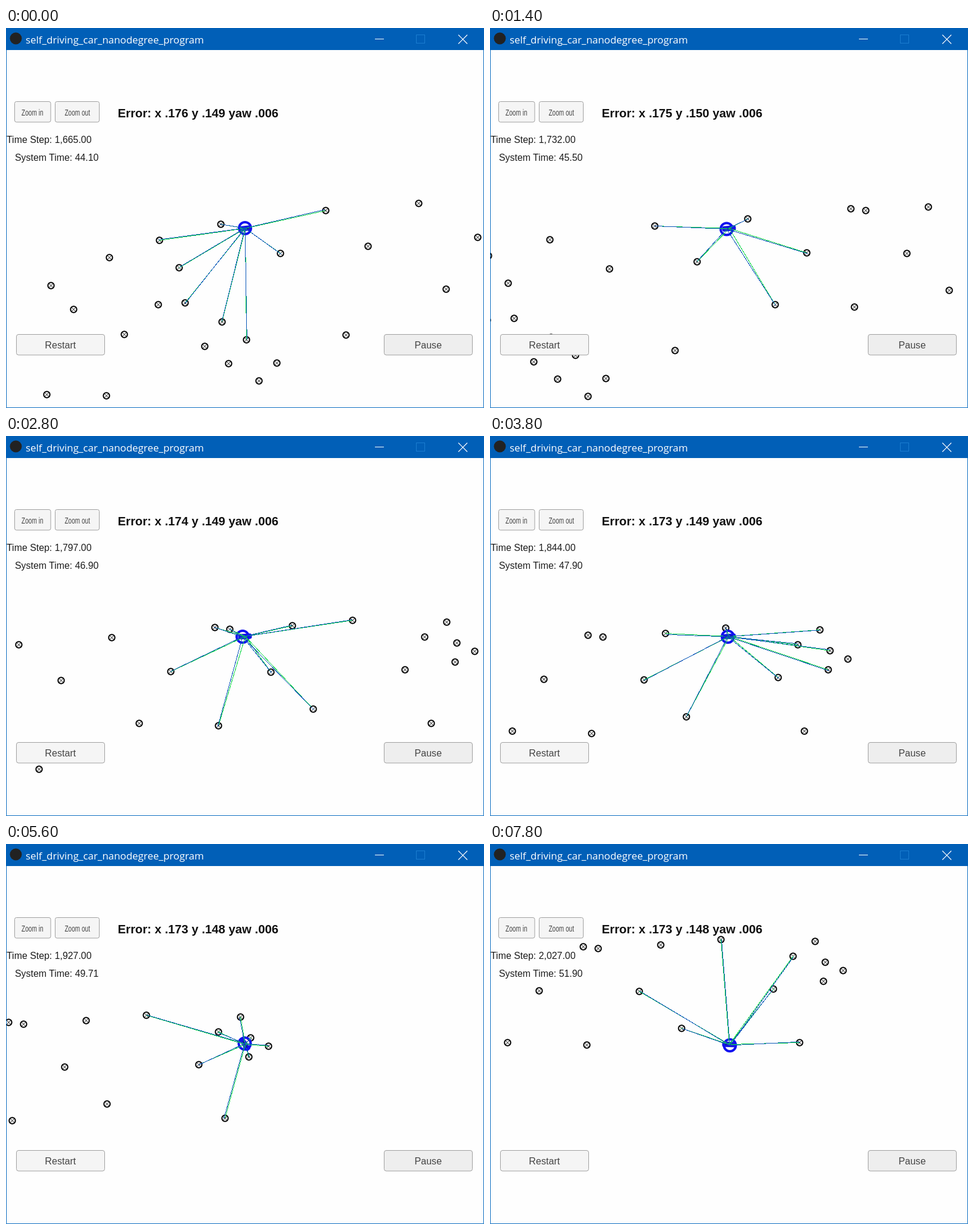
An HTML page that plays this animation: 802x638 px, repeating every 8 s.

```html
<!DOCTYPE html>
<html lang="en">
<head>
<meta charset="utf-8">
<title>Localization simulator</title>
<style>
html, body { margin: 0; width: 100%; height: 100%; overflow: hidden; background: #fefefe; }
svg { display: block; width: 802px; height: 638px; }
text { font-family: "Liberation Sans", Arial, sans-serif; font-size: 15.9px; fill: #1c1c1c; }
.title { font-family: "Open Sans", "Noto Sans", sans-serif; font-size: 16.9px; fill: #fff; }
.error { font-size: 20.3px; font-weight: bold; fill: #111; }
.label { font-size: 16.1px; fill: #444; text-anchor: middle; }
.small { font-size: 14px; }
.button rect { fill: #f5f5f5; stroke: #a0a0a0; }
.line { fill: none; stroke-width: 1; shape-rendering: crispEdges; }
</style>
</head>
<body>
<svg viewBox="0 0 802 638">
  <rect width="802" height="638" fill="#fefefe"/>
  <path id="rings" fill="none" stroke="#000" stroke-width="2"/>
  <path id="crosses" fill="none" stroke="#000" stroke-width="1"/>
  <g id="car">
    <rect x="-11.5" y="-4.5" width="23" height="9" rx="3.5" fill="#1616e4"/>
    <path d="M-6 0H7" stroke="#101070" stroke-width="2"/>
  </g>
  <circle id="guess" r="10" fill="none" stroke="#1010f0" stroke-width="4"/>
  <path id="sensed" class="line" stroke="#12d84a"/>
  <path id="believed" class="line" stroke="#0a58b8"/>

  <g class="button">
    <rect x="14.5" y="123.5" width="60.5" height="34.5" rx="3"/>
    <rect x="82.5" y="123.5" width="74" height="34.5" rx="3"/>
    <rect x="17.5" y="514.5" width="148" height="34.5" rx="3.5"/>
    <rect x="634.5" y="514.5" width="148" height="34.5" rx="3.5" style="fill:#eee"/>
  </g>
  <text class="label small" transform="translate(44.3 147) scale(.72 1)">Zoom in</text>
  <text class="label small" transform="translate(119.7 147) scale(.72 1)">Zoom out</text>
  <text class="label" x="91.3" y="538">Restart</text>
  <text class="label" x="708.3" y="538">Pause</text>
  <text id="error" class="error" x="187.5" y="150"></text>
  <text id="step" x="1" y="192.5"></text>
  <text id="clock" x="15" y="222.5"></text>

  <rect width="802" height="37" fill="#015fb7"/>
  <path d="M.5 37V637.5H801.5V37" fill="none" stroke="#0a6cc0"/>
  <circle cx="16.5" cy="17.5" r="10" fill="#222"/>
  <text class="title" x="33" y="26">self_driving_car_nanodegree_program</text>
  <g fill="none" stroke="#fff">
    <path d="M619 18.5H634"/>
    <rect x="688.5" y="11.5" width="14" height="14" stroke="#1b7cd0"/>
    <path d="M759 11.5L774 26.5M774 11.5L759 26.5" stroke-width="1.2"/>
  </g>
</svg>
<script>
const LOOP = 8000, TICK = 200, RANGE = 188.5;
const CAR = { x: 401, y: 336.5 };

// Landmarks in map pixels
const marks = [
  [536, 306], [692, 294], [607, 366], [791, 351], [738, 438], [360, 329], [257, 356], [173, 385],
  [290, 402], [300, 461], [255, 464], [75, 432], [113, 472], [198, 514], [362, 493], [403, 523],
  [333, 534], [373, 563], [454, 562], [424, 592], [570, 515], [460, 378], [68, 615], [168, 617],
  [865, 277], [890, 280], [995, 274], [959, 352], [871, 442], [1030, 414], [1096, 265], [1184, 348],
  [1217, 293], [1254, 268], [1271, 303], [1268, 335], [1301, 317], [1228, 438]
];

// Drive waypoints: time, position, velocity, errors (1/1000), step, clock, estimate offset
const route = [
  { t: 0,   x: 0,     y: 0,     vx: 187,  vy: -21, ex: 176, ey: 149, step: 1665, clock: 44.1,  dx: 0,   dy: -.5 },
  { t: 1.4, x: 259.7, y: -26.2, vx: 184,  vy: -15, ex: 175, ey: 150, step: 1732, clock: 45.5,  dx: -4,  dy: 1 },
  { t: 2.8, x: 515,   y: -43.7, vx: 187,  vy: -13, ex: 174, ey: 149, step: 1797, clock: 46.9,  dx: -4,  dy: .5 },
  { t: 3.8, x: 701,   y: -57.3, vx: 168,  vy: -13, ex: 173, ey: 149, step: 1844, clock: 47.9,  dx: -2,  dy: .5 },
  { t: 4.8, x: 808.7, y: -57,   vx: 80,   vy: 23,  ex: 173, ey: 148, step: 1891, clock: 48.92, dx: -2,  dy: -.5 },
  { t: 6.4, x: 864,   y: 49,    vx: -45,  vy: 112, ex: 172, ey: 147, step: 1962, clock: 50.5,  dx: 1,   dy: -2.5 },
  { t: 7.8, x: 709,   y: 105,   vx: -162, vy: -4,  ex: 173, ey: 148, step: 2027, clock: 51.9,  dx: 1.5, dy: 1.5 }
];

const el = id => document.getElementById(id);
const set = (id, name, value) => el(id).setAttribute(name, value);
const snap = v => Math.round(v) + .5;
const noise = n => {
  const s = Math.sin(n * 127.1 + 3.7) * 43758.5453;
  return (s - Math.floor(s) - .5) * 4;
};

// Cubic Hermite value and slope between two waypoints
function curve(a, b, key, u) {
  const T = b.t - a.t, p = a[key], q = b[key], v = a["v" + key] * T, w = b["v" + key] * T;
  const c = 3 * (q - p) - 2 * v - w, d = 2 * (p - q) + v + w;
  return { pos: p + u * (v + u * (c + u * d)), slope: v + u * (2 * c + 3 * u * d) };
}

function draw(tick) {
  const t = tick * TICK / 1000;
  let i = 0;
  while (i < route.length - 2 && t >= route[i + 1].t) i++;
  const a = route[i], b = route[i + 1], u = Math.min(1, (t - a.t) / (b.t - a.t));
  const mix = key => a[key] + (b[key] - a[key]) * u;
  const cx = curve(a, b, "x", u), cy = curve(a, b, "y", u);
  const gx = CAR.x + mix("dx"), gy = CAR.y + mix("dy");
  const heading = Math.atan2(cy.slope, cx.slope) * 180 / Math.PI;

  let rings = "", crosses = "", sensed = "", believed = "";
  marks.forEach(([mx, my], n) => {
    const x = snap(mx - cx.pos), y = snap(my - cy.pos);
    if (x < -8 || x > 810 || y > 646) return;
    rings += `M${x - 5.2} ${y}a5.2 5.2 0 1 0 10.4 0a5.2 5.2 0 1 0 -10.4 0`;
    crosses += `M${x - 3} ${y - 3}l6 6m0 -6l-6 6`;
    if (Math.hypot(x - CAR.x, y - CAR.y) > RANGE) return;
    const seed = n * 41 + tick;
    sensed += `M${CAR.x + .5} ${CAR.y}L${x} ${y}`;
    believed += `M${gx} ${gy}L${x + noise(seed)} ${y + noise(seed + .5)}`;
  });
  set("rings", "d", rings);
  set("crosses", "d", crosses);
  set("sensed", "d", sensed);
  set("believed", "d", believed);
  set("car", "transform", `translate(${CAR.x} ${CAR.y}) rotate(${heading})`);
  set("guess", "transform", `translate(${gx} ${gy})`);

  const step = Math.round(mix("step")).toLocaleString("en-US");
  el("error").textContent = `Error: x .${Math.round(mix("ex"))} y .${Math.round(mix("ey"))} yaw .006`;
  el("step").textContent = `Time Step: ${step}.00`;
  el("clock").textContent = `System Time: ${mix("clock").toFixed(2)}`;
}

function play() {
  draw(Math.floor(performance.now() % LOOP / TICK));
  requestAnimationFrame(play);
}
play();
</script>
</body>
</html>
```
